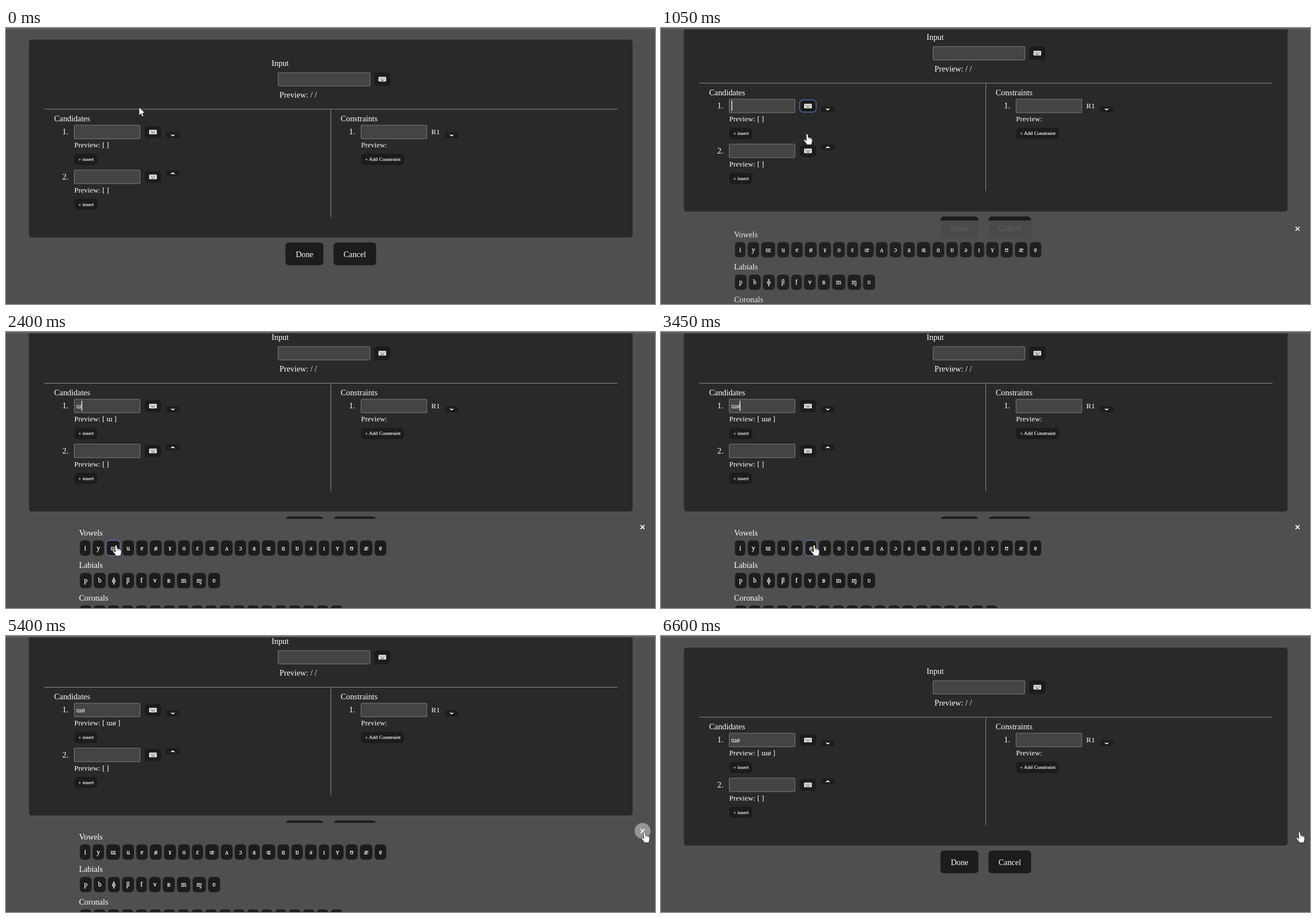
Animation, 1146 px wide and 488 px high, one loop 6750 ms. Source, as an HTML page:

```html
<!DOCTYPE html>
<html lang="en">
<head>
<meta charset="utf-8">
<title>Tableau editor</title>
<style>
  html, body { margin: 0; width: 100%; height: 100%; overflow: hidden; background: #4f4f4f; }
  svg { display: block; width: 1146px; height: 488px; }
  text { font: 14.3px "Liberation Serif", "Times New Roman", serif; fill: #fff; white-space: pre; }
  .mid { font-size: 13px; }
  .small { font-size: 9.1px; stroke: #fff; stroke-width: .15px; }
  .typed { font-size: 11.9px; }
  .key { font-size: 11.5px; text-anchor: middle; stroke: #fff; stroke-width: .25px; }
  .btn { fill: #1d1c1b; }
  .btn.hover { stroke: #5279c4; stroke-width: 1.3px; }
  .field { fill: #444; stroke: #7c7c7c; }
  .rule { stroke: #8b8c8b; }
  .pointer { fill: #fff; stroke: #222; stroke-width: .8px; stroke-linejoin: round; }
</style>
</head>
<body>
<svg viewBox="0 0 1146 488">
  <g id="page"></g>
  <g id="panel"></g>
  <rect width="1146" height="1" fill="#484848"/>
  <rect y="1" width="1146" height="1" fill="#808080"/>
  <path id="arrow" class="pointer" d="M0 0V14.6L3.4 11.5L5.7 16.6L8 15.6L5.8 10.6H10.3Z"/>
  <g id="hand" class="pointer">
    <path d="M-1.6 1.2C-1.6 -.5 1.2 -.5 1.4 1.2L2 6.2C3 5.3 4.3 5.7 4.6 6.9C5.5 6.1 6.8 6.5 7.1 7.8C8.2 7.3 9 8 9 9.2V13C9 15 7.9 16 7.7 18.8H-.6C-.8 16.4 -3.6 14.6 -5.6 11.6C-6.6 10 -4.8 8.9 -3.4 10.2L-1.2 12Z"/>
    <path d="M2 6.2L2.3 9.2M4.6 6.9L4.8 9.6M7.1 7.8V10" fill="none" stroke-width=".6"/>
  </g>
</svg>
<script>
const LOOP = 6750, STEP = 150, SCROLL = 53;
const $ = id => document.getElementById(id);
const page = $('page'), panel = $('panel'), arrow = $('arrow'), hand = $('hand');
const hits = [];

function add(parent, tag, attrs, content) {
  const el = document.createElementNS('http://www.w3.org/2000/svg', tag);
  for (const name in attrs) el.setAttribute(name, attrs[name]);
  if (content !== undefined) el.textContent = content;
  parent.append(el);
  return el;
}
const text = (parent, x, y, content, cls = '') => add(parent, 'text', { x, y, class: cls }, content);
const box = (parent, x, y, width, height, rx, cls) =>
  add(parent, 'rect', { x, y, width, height, rx, class: cls });

function button(parent, x, y, w, h, rx = 6) {
  const el = box(parent, x, y, w, h, rx, 'btn');
  hits.push({ el, parent, x, y, w, h });
}
function keyboardButton(cx, cy, h) {
  button(page, cx - 14.5, cy - h / 2, 29, h);
  add(page, 'rect', { x: cx - 6.7, y: cy - 4, width: 13.4, height: 8, rx: 1, fill: '#fff' });
  add(page, 'path', {
    d: `M${cx - 5} ${cy - 1.9}h10.4M${cx - 5} ${cy}h10.4`,
    stroke: '#1d1c1b', 'stroke-dasharray': '1.2 1'
  });
  add(page, 'path', { d: `M${cx - 3.2} ${cy + 2.1}h6.4`, stroke: '#1d1c1b' });
}
function chevronButton(x, y, dir) {
  button(page, x, y, 24.5, 10.5, 5.2);
  const cx = x + 12.2, cy = y + 5.5;
  add(page, 'path', {
    d: `M${cx - 4.5} ${cy - 1.6 * dir}Q${cx} ${cy - .2 * dir} ${cx + 4.5} ${cy - 1.6 * dir}L${cx} ${cy + 1.9 * dir}Z`,
    fill: '#fff'
  });
}
function candidate(n, y, dir) {
  text(page, 99.5, y + 17, n + '.');
  box(page, 120.5, y + .5, 116, 24, 1, 'field');
  keyboardButton(259.5, y + 12.5, 21.5);
  chevronButton(282.3, dir > 0 ? y + 13 : y + .8, dir);
  button(page, 120.7, y + 51, 40.5, 20);
  text(page, 127.5, y + 63.8, '+ insert', 'small');
  return text(page, 120.5, y + 39.8, 'Preview: [ ]', 'mid');
}

// Form
add(page, 'rect', { x: 40.5, y: 20.5, width: 1066, height: 350, rx: 5, fill: '#282a29' });
text(page, 469, 67.3, 'Input');
box(page, 480.5, 78.9, 162, 23.6, 1, 'field');
keyboardButton(664.5, 90.6, 24);
text(page, 483, 123, 'Preview: / /');
add(page, 'path', { d: 'M67.5 143.5H1080M573.5 143.5V334.5', class: 'rule' });

text(page, 85, 165, 'Candidates');
const preview = candidate(1, 171.4, 1);
candidate(2, 250.7, -1);

text(page, 591, 165, 'Constraints');
text(page, 605.8, 188.4, '1.');
box(page, 627, 171.9, 116, 24, 1, 'field');
text(page, 751, 188.2, 'R1', 'mid');
chevronButton(774.7, 184.4, 1);
text(page, 627, 211.2, 'Preview:', 'mid');
button(page, 627, 222.4, 76, 20);
text(page, 633.8, 235.2, '+ Add Constraint', 'small');

button(page, 493.5, 379.2, 67, 40.3);
text(page, 511.7, 405, 'Done');
button(page, 578.3, 379.2, 75.3, 40.3);
text(page, 596, 405, 'Cancel');

const typed = text(page, 124, 187.6, '', 'typed');
const caret = add(page, 'rect', { y: 174.6, width: 1.3, height: 18, fill: '#fff' });

// Symbol keyboard
function keyRow(label, y, symbols, lefts) {
  text(panel, 129, y, label);
  [...symbols].forEach((symbol, i) => {
    const w = lefts[i + 1] - lefts[i] - 4;
    button(panel, lefts[i], y + 8.8, w, 27, 6);
    text(panel, lefts[i] + w / 2, y + 26, symbol, 'key');
  });
}
add(panel, 'rect', { y: 330.3, width: 1146, height: 160, fill: '#4f4f4f' });
keyRow('Vowels', 359.6, 'iyɯueøɤoɛœʌɔaɶɑɒəɪʏʊæɐ',
  [130.5, 153, 177, 205.5, 230, 254, 279, 304, 328.5, 352, 379.5, 404, 428, 452,
   479.5, 504, 528, 552.5, 574.5, 600, 625, 651, 675.5]);
keyRow('Labials', 417.2, 'pbɸβfvʙmɱʋ',
  [130.5, 155, 180, 205, 230, 252.5, 277, 302, 329.5, 357, 382]);
keyRow('Coronals', 474.8, 'tdnrɾszʃʒɹlɬɮθðʈɖɳɽ',
  Array.from({ length: 20 }, (_, i) => 130.5 + 24.6 * i));
const disc = add(panel, 'circle', { cx: 1124, cy: 344.5, r: 14, fill: '#fff', 'fill-opacity': .4 });
add(panel, 'path', { d: 'M1120.5 341.3l7 7m0 -7l-7 7', stroke: '#fff', 'stroke-width': 1.7 });
hits.push({ el: disc, parent: panel, x: 1110, y: 331, w: 28, h: 28 });

// time, panel opacity, page scroll
const slide = [
  [0, 0, 0], [750, 0, 0], [900, .31, 11.7], [1050, .9, 46], [1200, 1, SCROLL],
  [6000, 1, SCROLL], [6150, .87, 45], [6300, .375, 15.8], [6450, .03, 1], [6600, 0, 0], [LOOP, 0, 0]
];
// start, end, destination
const moves = [
  [0, 450, 258, 187.5],
  [1200, 1800, 190, 377],
  [2250, 3300, 270.5, 377],
  [3750, 5250, 1127.5, 346.5]
];
const clicks = [900, 1950, 3450, 6000];

function slideAt(t) {
  const i = slide.findIndex(s => s[0] > t);
  const a = slide[i - 1], b = slide[i], k = (t - a[0]) / (b[0] - a[0]);
  return [1, 2].map(n => a[n] + (b[n] - a[n]) * k);
}
function pointerAt(t) {
  let x = 235, y = 140;
  for (const [start, end, toX, toY] of moves) {
    const k = Math.min(1, Math.max(0, (t - start) / (end - start)));
    const ease = k * k * (3 - 2 * k);
    x += (toX - x) * ease;
    y += (toY - y) * ease;
  }
  return [x, y];
}
// Hover is only refreshed by pointer movement, not by scrolling
function hoverAt(t, x, y) {
  const open = t >= 1350;
  const inside = (h, py) => x >= h.x && x <= h.x + h.w && py >= h.y && py <= h.y + h.h;
  if (open && y > 330) return hits.find(h => h.parent === panel && inside(h, y));
  return hits.find(h => h.parent === page && inside(h, open ? y + SCROLL : y));
}

function draw(now) {
  const t = Math.floor((now % LOOP) / STEP) * STEP;
  const [shown, scroll] = slideAt(t);
  page.setAttribute('transform', `translate(0 ${-scroll})`);
  panel.setAttribute('transform', `translate(0 ${100 * (1 - shown)})`);
  panel.setAttribute('opacity', shown);

  const count = t >= 3450 ? 2 : t >= 1950 ? 1 : 0;
  const word = 'ɯø'.slice(0, count);
  typed.textContent = word;
  preview.textContent = word ? `Preview: [ ${word} ]` : 'Preview: [ ]';
  const click = clicks.filter(c => c <= t).pop();
  caret.setAttribute('x', [124.4, 133.2, 138.8][count]);
  caret.setAttribute('opacity', (t - click) % 1060 < 530 ? 1 : 0);

  const [x, y] = pointerAt(t);
  const hover = hoverAt(t, x, y);
  for (const h of hits) h.el.classList.toggle('hover', h === hover);
  disc.setAttribute('opacity', hover && hover.el === disc ? 1 : 0);
  for (const el of [arrow, hand]) el.setAttribute('transform', `translate(${x} ${y})`);
  hand.setAttribute('opacity', hover ? 1 : 0);
  arrow.setAttribute('opacity', hover ? 0 : 1);
}

const begin = performance.now();
function tick() {
  draw(performance.now() - begin);
  requestAnimationFrame(tick);
}
tick();
</script>
</body>
</html>
```
